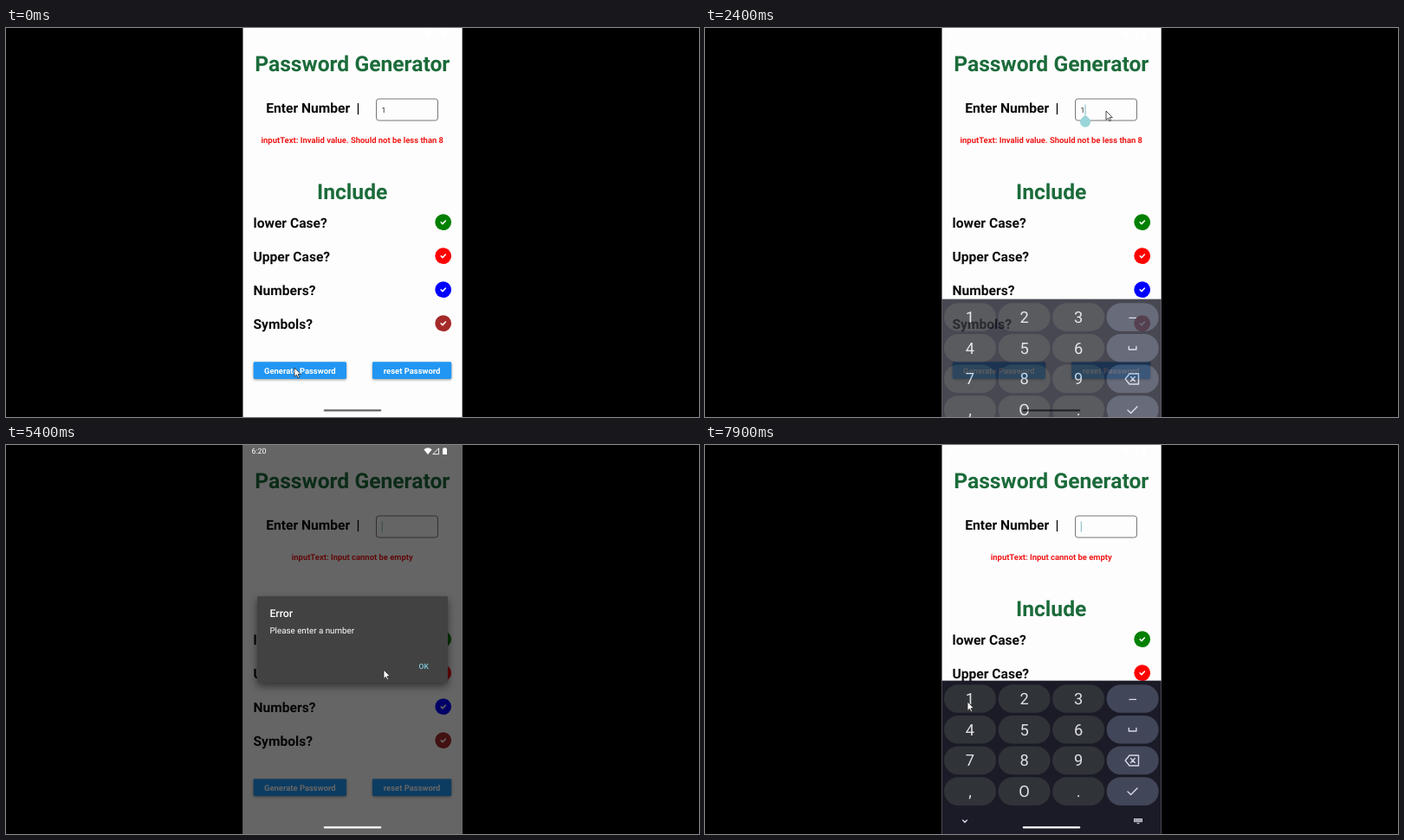
Write an HTML page that moves like this. It is 800 px wide and 450 px high and loops after 8000 ms.

```html
<!DOCTYPE html>
<html lang="en">
<head>
<meta charset="utf-8">
<title>Password Generator</title>
<style>
  html, body { margin: 0; width: 100%; height: 100%; overflow: hidden; background: #000; }
  svg { display: block; width: 800px; height: 450px; font-family: Roboto, Arial, sans-serif; text-rendering: geometricPrecision; }
  .mid { text-anchor: middle; }
  .head { font-size: 24.65px; font-weight: 600; fill: #1b6b3a; }
  .label { font-size: 15.6px; font-weight: 600; fill: #0a0a0a; }
  .small { font-size: 9.45px; font-weight: 600; }
  .line { fill: none; stroke-linecap: round; stroke-linejoin: round; }
  .button { fill: #2196f3; filter: drop-shadow(0 1.5px 1.5px rgba(0,0,0,.4)); }
  .digit { font-size: 18.3px; fill: #dfe0e4; }
  .panel { fill: #424242; filter: drop-shadow(0 4px 5px rgba(0,0,0,.5)); }
</style>
</head>
<body>
<svg viewBox="0 0 800 450">
  <clipPath id="screen"><rect x="273.5" width="253.2" height="450"/></clipPath>
  <g clip-path="url(#screen)">
    <rect x="273" width="255" height="450" fill="#fdfdfd"/>
    <text class="head mid" x="399.8" y="50">Password Generator</text>
    <text class="label" x="300.3" y="98.3">Enter Number</text>
    <text class="label" x="404.6" y="98.3" font-weight="500">|</text>
    <rect x="427.5" y="82" width="71" height="25" rx="3" fill="none" stroke="#777"/>
    <text id="value" x="433.6" y="97.6" font-size="8.6" fill="#222">1</text>
    <rect id="caret" y="88.5" width="1" height="12" fill="#7fb9bf"/>
    <path id="handle" d="M439 100.5L443.4 104.6A6 6 0 1 1 434.6 104.6Z" fill="#9ad5d9"/>
    <text id="error" class="small mid" x="399.8" y="132.6" fill="#f01818"></text>
    <text class="head mid" x="399.7" y="198.1">Include</text>
    <g id="options"></g>
    <g id="buttons"></g>

    <g id="keyboard">
      <rect x="273" y="272.6" width="255" height="178" fill="#1b1b27"/>
      <g id="keys"></g>
      <g class="line" stroke="#d5d8e6" stroke-width="1.4">
        <path d="M490 294.4h7.4"/>
        <path d="M489.3 327.5v3.5h8.6v-3.5"/>
        <path d="M490 359h10.5v12H490l-4.8-6zM491.5 362.6l4.8 4.8m0-4.8l-4.8 4.8"/>
        <path d="M488 401l3.6 3.6 7.4-7.6"/>
        <path d="M297.6 434l2.4 2.4 2.4-2.4"/>
      </g>
      <rect x="495" y="432" width="10" height="4.3" rx=".6" fill="#c8cad2"/>
      <path d="M496 433.3h8M496 434.8h8" stroke="#1b1b27" stroke-width=".6" stroke-dasharray="1 .75"/>
      <path d="M498 437h4l-2 1.5z" fill="#c8cad2"/>
    </g>

    <g id="dialog">
      <rect x="273" width="255" height="450" opacity=".6"/>
      <rect class="panel" x="290" y="175" width="220" height="100" rx="1.2"/>
      <g fill="#fff">
        <text x="304.4" y="199" font-size="12.3" font-weight="500">Error</text>
        <text x="304.4" y="217.6" font-size="9.8">Please enter a number</text>
      </g>
      <text x="476.6" y="259.2" font-size="8.6" font-weight="500" fill="#7fc8dc">OK</text>
    </g>

    <g fill="#fff">
      <text x="283.4" y="10.4" font-size="8.8">6:20</text>
      <path d="M482.3 5.2Q487 1.2 491.7 5.2L487 11z"/>
      <path d="M492.8 10.6L499.6 3.8V10.6z" fill="none" stroke="#fff" stroke-width=".9"/>
      <path d="M504 4h1.4v-1h2.2v1h1.4v7h-5z"/>
    </g>
    <rect id="pillDark" x="366.7" y="441.2" width="66.6" height="2.3" rx="1.1"/>
    <rect id="pillLight" x="366.7" y="441.2" width="66.6" height="2.3" rx="1.1" fill="#fff"/>
  </g>
  <path id="pointer" d="M0 0V10.4L2.4 8.2L4 11.8L5.6 11.1L4 7.6H7.3Z" fill="#fff" stroke="#222" stroke-width=".8" stroke-linejoin="round"/>
</svg>
<script>
const LOOP = 8000, STEP = 100, FADE = 300;
const el = id => document.getElementById(id);

const options = [["lower Case?", "green"], ["Upper Case?", "red"], ["Numbers?", "blue"], ["Symbols?", "brown"]];
el("options").innerHTML = options.map(([name, color], i) => `
  <g transform="translate(0 ${i * 39})">
    <text class="label" x="285.5" y="230.9">${name}</text>
    <circle cx="504.7" cy="224.7" r="9.4" fill="${color}"/>
    <path class="line" d="M502.2 224.8l1.8 1.8 3.4-3.6" stroke="#fff" stroke-width="1.6"/>
  </g>`).join("");

const buttons = [["Generate Password", 285.7, 107.3], ["reset Password", 423, 91.2]];
el("buttons").innerHTML = buttons.map(([name, x, w]) => `
  <rect class="button" x="${x}" y="386.3" width="${w}" height="19.6" rx="1.4"/>
  <text class="small mid" x="${x + w / 2}" y="399.7" fill="#fff">${name}</text>`).join("");

// Blank keys carry drawn icons; the round O stands for a wide zero.
el("keys").innerHTML = [..."123 456 789 ,O. "].map((char, i) => {
  const col = i % 4, x = 306 + col * 62.55, y = 293.5 + Math.floor(i / 4) * 35.7;
  return `<rect x="${x - 30}" y="${y - 16.3}" width="60" height="32.6" rx="16.3" fill="${col === 3 ? "#424659" : "#303338"}"/>
    <text class="digit mid" x="${x}" y="${y + 6.5}">${char}</text>`;
}).join("");

// Pointer stops: time, x, y. The pointer rests around each one.
const stops = [
  [100, 333, 393], [1000, 477, 255], [2160, 463, 96], [3100, 492, 361], [3900, 494, 398],
  [4700, 333, 393], [5300, 436, 260], [5700, 480, 253], [6700, 461, 103], [7900, 303, 297]
];

const clamp = x => Math.min(1, Math.max(0, x));
const smooth = x => x * x * (3 - 2 * x);
const ramp = (t, from) => clamp((t - from) / FADE);
const pulse = (t, on, off) => ramp(t, on) - ramp(t, off);
const dialogAt = t => pulse(t, 100, 1000) + pulse(t, 4700, 5700);
const keyboardAt = t => pulse(t, 2160, 4000) + ramp(t, 6760);

function pointerAt(t) {
  const i = Math.max(1, stops.findIndex(s => s[0] > t));
  const [t0, x0, y0] = stops[i - 1], [t1, x1, y1] = stops[i];
  const gap = t1 - t0, rest = Math.min(300, gap * .3);
  const u = smooth(clamp((t - t0 - rest) / (gap - 2 * rest)));
  return [x0 + (x1 - x0) * u, y0 + (y1 - y0) * u];
}

const show = (id, amount) => el(id).setAttribute("opacity", Number(amount));
const move = (id, x, y) => el(id).setAttribute("transform", `translate(${x} ${y})`);

function render(t) {
  const empty = t >= 3200, focused = t >= 2200 && t < 5900 || t >= 6900;
  const keyboard = keyboardAt(t);
  const pill = clamp(dialogAt(t - 250) + keyboardAt(t - 250));
  el("error").textContent = "inputText: " +
    (empty ? "Input cannot be empty" : "Invalid value. Should not be less than 8");
  el("caret").setAttribute("x", empty ? 433.8 : 438.5);
  show("value", !empty);
  show("caret", focused);
  show("handle", focused && !empty);
  show("keyboard", keyboard);
  move("keyboard", 0, (1 - keyboard) * 205);
  show("dialog", dialogAt(t));
  show("pillDark", .6 * (1 - pill));
  show("pillLight", pill);
  move("pointer", ...pointerAt(Math.min(t, stops[stops.length - 1][0] - 1)));
}

const start = performance.now();
function tick() {
  const t = (performance.now() - start) % LOOP;
  render(Math.floor(t / STEP) * STEP);
  requestAnimationFrame(tick);
}
render(0);
requestAnimationFrame(tick);
</script>
</body>
</html>
```
